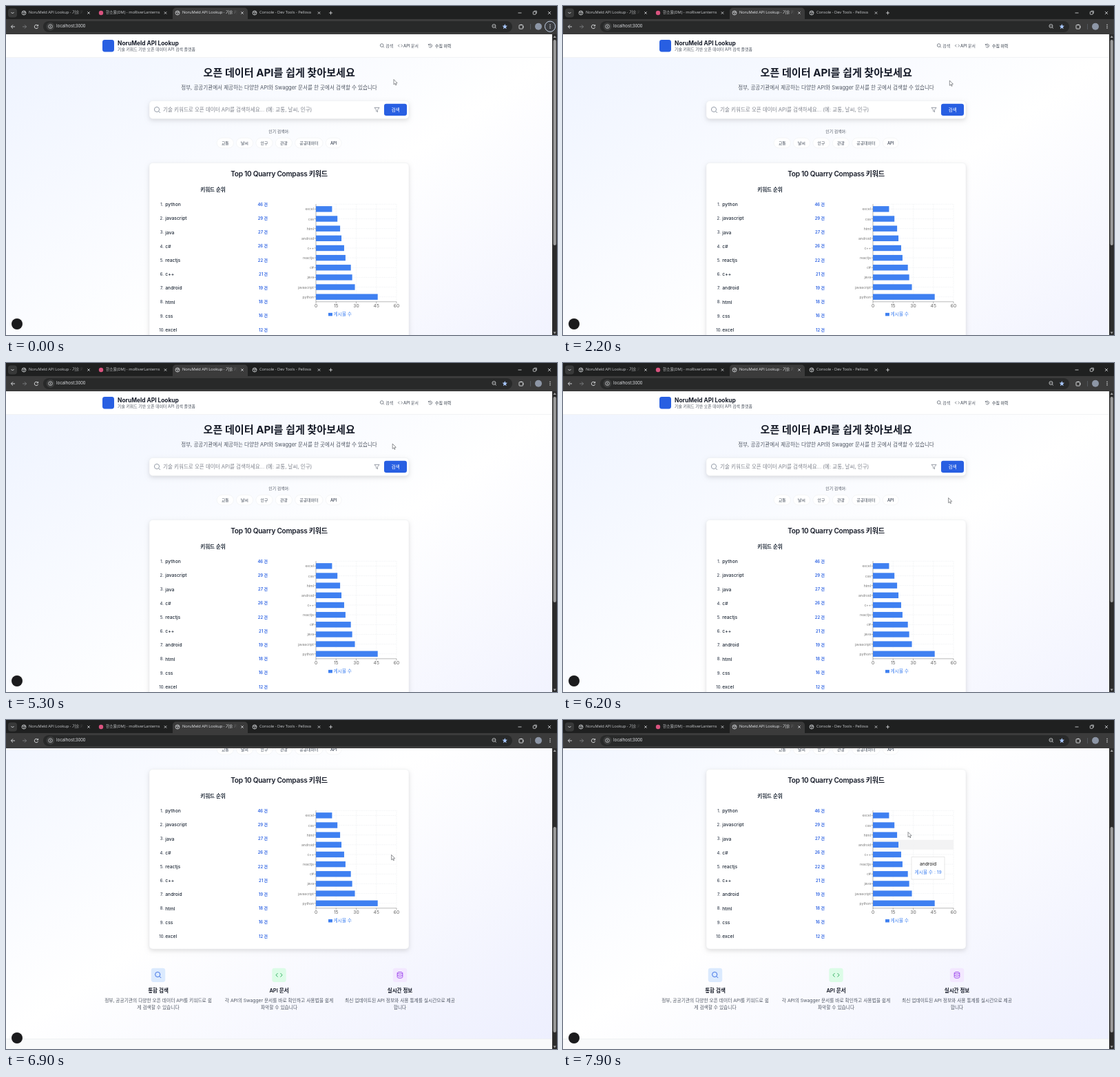
Animation, 800 px wide and 477 px high, one loop 8 s. Source, as an HTML page with a canvas:

```html
<!DOCTYPE html>
<html lang="ko">
<head>
<meta charset="utf-8">
<title>API Lookup</title>
<style>
html, body { margin: 0; width: 100%; height: 100%; overflow: hidden; background: #fff; }
canvas { display: block; width: 800px; height: 477px; }
</style>
</head>
<body>
<canvas id="stage"></canvas>
<script>
const W = 800, H = 477, LOOP = 8000, STEP = 100;
const VIEW_W = 793, VIEW_TOP = 41;
const canvas = document.getElementById('stage');
const dpr = window.devicePixelRatio || 1;
canvas.width = W * dpr;
canvas.height = H * dpr;
const c = canvas.getContext('2d');

const SANS = 'Inter, "Noto Sans CJK KR", "Noto Sans CJK", sans-serif';
const UI = '"Open Sans", "Noto Sans CJK KR", "Noto Sans CJK", sans-serif';
const XS = 5.04, SM = 5.88, BASE = 6.72, LG = 7.56, XL = 8.4;
const BLUE = '#285fe2', BAR = '#3f80f1', INK = '#161b28', GRAY = '#4f5662', BORDER = '#e8eaee';

const KEYWORDS = [
  ['python', 46], ['javascript', 29], ['java', 27], ['c#', 26], ['reactjs', 22],
  ['c++', 21], ['android', 19], ['html', 18], ['css', 16], ['excel', 12]
];
const CHIPS = [['교통', 318.3], ['날씨', 346.5], ['인구', 375], ['관광', 403.4], ['공공데이터', 439.8], ['API', 475.7]];
const FEATURES = [
  { x: 221, bg: '#dbeafe', ink: BLUE, icon: searchIcon, title: '통합 검색',
    lines: ['정부, 공공기관의 다양한 오픈 데이터 API를 키워드로 쉽', '게 검색할 수 있습니다'] },
  { x: 396.5, bg: '#dcfce7', ink: '#16a34a', icon: codeIcon, title: 'API 문서',
    lines: ['각 API의 Swagger 문서를 바로 확인하고 사용법을 쉽게', '파악할 수 있습니다'] },
  { x: 572, bg: '#f3e8ff', ink: '#9333ea', icon: dataIcon, title: '실시간 정보',
    lines: ['최신 업데이트된 API 정보와 사용 통계를 실시간으로 제공', '합니다'] }
];

// Keys: [time, value, value, ...], eased between neighbours
const POINTER = [[0, 563, 106.5], [1900, 563, 106.5], [2200, 561.3, 108], [2600, 561.3, 108],
  [3100, 561.3, 110.8], [5200, 561.3, 110.8], [5800, 559.6, 195.5], [7400, 559.6, 195.5], [7900, 501, 162.5]];
const SCROLL = [[0, 0], [6700, 0], [6900, 156]];
const TIP = [[7600, 532, 202], [7900, 506, 198.5]];

function track(keys, t) {
  let i = 0;
  while (i < keys.length - 1 && keys[i + 1][0] <= t) i++;
  const a = keys[i], b = keys[i + 1];
  if (!b || t < a[0]) return a.slice(1);
  const k = (t - a[0]) / (b[0] - a[0]), e = k * k * (3 - 2 * k);
  return a.slice(1).map((v, n) => v + (b[n + 1] - v) * e);
}

function text(s, x, y, size, color, weight = 400, align = 'left', family = SANS) {
  c.font = `${weight} ${size}px ${family}`;
  c.textAlign = align;
  c.textBaseline = 'middle';
  c.fillStyle = color;
  c.fillText(s, x, family === SANS ? y + size * 0.04 : y);
}

function rect(x, y, w, h, color) {
  c.fillStyle = color;
  c.fillRect(x, y, w, h);
}

function box(x, y, w, h, r, fill, border, lw = 0.45) {
  c.beginPath();
  c.roundRect(x, y, w, h, r);
  if (fill) { c.fillStyle = fill; c.fill(); }
  if (border) { c.strokeStyle = border; c.lineWidth = lw; c.stroke(); }
}

function disc(x, y, r, fill, border, lw = 0.8) {
  box(x - r, y - r, 2 * r, 2 * r, r, fill, border, lw);
}

// Each argument after the width is a flat list x, y, x, y, ...
function lines(color, lw, ...paths) {
  c.strokeStyle = color;
  c.lineWidth = lw;
  c.beginPath();
  for (const p of paths)
    for (let i = 0; i < p.length; i += 2) i ? c.lineTo(p[i], p[i + 1]) : c.moveTo(p[i], p[i + 1]);
  c.stroke();
}

function panel(x, y, w, h) {
  c.save();
  c.shadowColor = 'rgba(0,0,0,.13)';
  c.shadowBlur = 6.5 * dpr;
  c.shadowOffsetY = 2.6 * dpr;
  box(x, y, w, h, 5, '#fff');
  c.restore();
  box(x, y, w, h, 5, null, BORDER);
}

function searchIcon(x, y, s, color, lw = 0.8) {
  disc(x - s * 0.08, y - s * 0.08, s * 0.36, null, color, lw);
  lines(color, lw, [x + s * 0.18, y + s * 0.18, x + s * 0.42, y + s * 0.42]);
}

function codeIcon(x, y, s, color, lw = 0.8) {
  const a = s * 0.2, b = s * 0.45, h = s * 0.27;
  lines(color, lw, [x - a, y - h, x - b, y, x - a, y + h], [x + a, y - h, x + b, y, x + a, y + h]);
}

function dataIcon(x, y, s, color, lw = 0.8) {
  const rx = s * 0.38, ry = s * 0.14, top = y - s * 0.3;
  c.strokeStyle = color;
  c.lineWidth = lw;
  c.beginPath();
  c.ellipse(x, top, rx, ry, 0, 0, Math.PI * 2);
  for (const d of [0.3, 0.6]) {
    c.moveTo(x + rx, top + s * d);
    c.ellipse(x, top + s * d, rx, ry, 0, 0, Math.PI);
  }
  c.moveTo(x - rx, top); c.lineTo(x - rx, top + s * 0.6);
  c.moveTo(x + rx, top); c.lineTo(x + rx, top + s * 0.6);
  c.stroke();
}

function historyIcon(x, y, color) {
  c.strokeStyle = color;
  c.lineWidth = 0.7;
  c.beginPath();
  c.arc(x, y, 2.5, -2.6, 2.7);
  c.stroke();
  lines(color, 0.7, [x - 2.6, y - 2.7, x - 2.6, y - 1, x - 0.9, y - 1], [x, y - 1.4, x, y + 0.1, x + 1.2, y + 0.8]);
}

function globe(x, y) {
  disc(x, y, 3, null, '#d5d7da', 0.8);
  lines('#d5d7da', 0.9, [x - 2.4, y - 1.2, x - 0.2, y - 0.6, x + 0.4, y + 0.8, x - 0.4, y + 2.4], [x + 0.4, y - 2.4, x + 1, y - 0.8, x + 2.6, y - 0.2]);
}

function cross(x, y, s, color) {
  lines(color, 0.8, [x - s, y - s, x + s, y + s], [x + s, y - s, x - s, y + s]);
}

function tabTitle(s, x, end, color) {
  const fade = c.createLinearGradient(end - 12, 0, end, 0);
  fade.addColorStop(0, color);
  fade.addColorStop(1, 'rgba(160,160,160,0)');
  text(s, x, 10, 5.7, fade, 400, 'left', UI);
}

function browser(t) {
  const pale = '#dfe1e4';
  rect(0, 0, W, 20, '#1f2020');
  rect(0, 19, W, 22, '#3b3b3b');
  box(3, 3.5, 13, 13, 4, '#383939');
  lines(pale, 0.9, [7.5, 9, 9.5, 11, 11.5, 9]);

  box(242, 2.5, 109, 20, [5, 5, 0, 0], '#3b3b3b');
  globe(26, 10);
  tabTitle('NoruMeld API Lookup - 기술 키워드', 33, 113, '#c9cbce');
  disc(138, 10, 3.2, '#d9537f');
  tabTitle('한소율(DM) - moRiverLanterns', 145, 236, '#c9cbce');
  globe(249, 10);
  tabTitle('NoruMeld API Lookup - 기술 키워드', 256, 337, '#e8eaed');
  globe(361, 10);
  tabTitle('Console - Dev Tools - Pellova', 368, 458, '#c9cbce');
  for (const x of [120, 231.5, 343, 454.5]) cross(x, 10, 1.7, pale);
  lines(pale, 0.8, [469, 10, 474, 10], [471.5, 7.5, 471.5, 12.5]);
  lines(pale, 0.8, [743.5, 10, 748.5, 10]);
  box(765.3, 8.2, 4, 4, 0.6, null, pale, 0.8);
  lines(pale, 0.7, [766.7, 7.2, 770.4, 7.2, 770.4, 10.8]);
  cross(789, 10, 2.1, pale);

  lines(pale, 0.9, [13, 30, 7.5, 30], [10, 27.4, 7.4, 30, 10, 32.6]);
  lines('#7d7f82', 0.9, [24, 30, 29.5, 30], [27, 27.4, 29.6, 30, 27, 32.6]);
  c.strokeStyle = pale;
  c.lineWidth = 0.9;
  c.beginPath();
  c.arc(44, 30, 2.7, 0.3, 5.6);
  c.stroke();
  lines(pale, 0.9, [46.6, 27, 46.6, 29, 44.6, 29]);

  box(54, 22, 681, 16, 8, '#282929');
  disc(64.5, 29.7, 6, '#3b3c3c');
  disc(64.5, 29.7, 2.8, null, pale, 0.7);
  lines(pale, 0.8, [64.5, 29.3, 64.5, 31.2], [64.5, 27.9, 64.5, 28.6]);
  text('localhost:3000', 73, 29.5, 6.3, '#e8eaed', 400, 'left', UI);
  searchIcon(709, 29.6, 7, pale);
  lines(pale, 0.6, [707.3, 29, 709.6, 29]);

  c.fillStyle = '#a8c7fa';
  c.beginPath();
  for (let i = 0; i < 10; i++) {
    const r = i % 2 ? 1.7 : 3.9, a = i * Math.PI / 5 - Math.PI / 2;
    c.lineTo(724.3 + r * Math.cos(a), 30 + r * Math.sin(a));
  }
  c.fill();
  box(745, 27.5, 5.6, 5.6, 0.8, null, pale, 0.9);
  disc(748, 27.3, 0.9, pale);
  disc(750.8, 30.3, 0.9, pale);
  lines('#5b6066', 0.8, [761.5, 26, 761.5, 34]);
  disc(773, 29.7, 5, '#8d96a6');
  if (t < 2000) disc(790, 29.7, 7.6, '#3b3d41', '#d3e1f8', 0.9);
  for (const d of [-2.4, 0, 2.4]) disc(790, 29.7 + d, 0.75, pale);
}

function scrollbar(scroll) {
  rect(VIEW_W, VIEW_TOP, W - VIEW_W, H - VIEW_TOP, '#2c2c2c');
  box(794.6, 49 + scroll * 0.68, 4.2, 298, 2.1, '#9c9c9c');
  c.fillStyle = '#a4a4a4';
  for (const [y, d] of [[46, -3], [472.5, 3]]) {
    c.beginPath();
    c.moveTo(794.6, y); c.lineTo(798.8, y); c.lineTo(796.7, y + d);
    c.fill();
  }
}

// Diagonal wash, corner to corner as in CSS "to bottom right"
function background() {
  const y = 75, h = 543, k = VIEW_W * h / (VIEW_W ** 2 + h ** 2);
  const cx = VIEW_W / 2, cy = y + h / 2, dx = h * k, dy = VIEW_W * k;
  const g = c.createLinearGradient(cx - dx, cy - dy, cx + dx, cy + dy);
  g.addColorStop(0, '#eff4ff');
  g.addColorStop(0.5, '#ffffff');
  g.addColorStop(1, '#edeffe');
  rect(0, y, VIEW_W, h, g);
  rect(0, 618, VIEW_W, 40, '#f9fafb');
  rect(0, 618, VIEW_W, 0.5, '#e5e7eb');
}

function header() {
  rect(0, VIEW_TOP, VIEW_W, 34, '#fff');
  rect(0, 74.5, VIEW_W, 0.5, '#e5e7eb');
  box(140, 49, 17, 17.5, 3.4, BLUE);
  text('NoruMeld API Lookup', 162, 53.8, XL, INK, 700);
  text('기술 키워드 기반 오픈 데이터 API 검색 플랫폼', 162, 63.3, SM, GRAY);
  searchIcon(546.2, 57.6, 6.5, GRAY, 0.7);
  text('검색', 551.3, 57.5, SM, GRAY, 500);
  codeIcon(572.5, 57.6, 6.8, GRAY, 0.7);
  text('API 문서', 577, 57.5, SM, GRAY, 500);
  historyIcon(616, 57.6, GRAY);
  text('수집 이력', 623, 57.5, SM, '#1f2937', 500);
}

function hero() {
  text('오픈 데이터 API를 쉽게 찾아보세요', 396.7, 96.8, 15.12, INK, 700, 'center');
  text('정부, 공공기관에서 제공하는 다양한 API와 Swagger 문서를 한 곳에서 검색할 수 있습니다', 396.5, 118, LG, GRAY, 400, 'center');
  panel(208, 137.5, 377, 26);
  searchIcon(219.8, 150.8, 10, '#8b93a1', 0.9);
  text('기술 키워드로 오픈 데이터 API를 검색하세요... (예: 교통, 날씨, 인구)', 228, 150.3, LG, '#80858f');
  lines('#6b7280', 0.7, [535, 147.3, 542, 147.3, 539.5, 150.6, 539.5, 153.6, 537.6, 152.6, 537.6, 150.6, 535, 147.3]);
  box(549, 141.8, 33, 17.2, 3.2, BLUE);
  text('검색', 565.6, 150.3, BASE, '#fff', 500, 'center');
  text('인기 검색어:', 396.5, 181.5, SM, GRAY, 400, 'center');
  for (const [name, x] of CHIPS) {
    c.font = `500 ${SM}px ${SANS}`;
    const w = c.measureText(name).width + 13.4;
    box(x - w / 2, 191.3, w, 14.6, 7.3, '#fff', BORDER);
    text(name, x, 198.6, SM, '#374151', 500, 'center');
  }
}

function card(tip) {
  panel(208, 227.5, 377, 260.5);
  c.letterSpacing = '-0.25px';
  text('Top 10 Quarry Compass 키워드', 396.5, 244, 10.08, INK, 600, 'center');
  c.letterSpacing = '0px';
  text('키워드 순위', 300.5, 266.5, LG, '#1f2937', 600, 'center');
  KEYWORDS.forEach(([name, n], i) => {
    const y = 288 + i * 20.2;
    text(`${i + 1}.`, 226.3, y, SM, '#374151', 500, 'center');
    text(name, 231.3, y, BASE, '#1f2937', 500);
    text(`${n} 건`, 380, y - 0.2, SM, BLUE, 600, 'right');
  });
  chart(tip);
}

function chart(tip) {
  const x0 = 450, x1 = 567, y0 = 287.3, y1 = 428.8;
  const unit = (x1 - x0) / 60, band = (y1 - y0) / 10;
  const rowY = i => y1 - (i + 0.5) * band;

  c.setLineDash([1.3, 1.3]);
  for (let v = 0; v <= 60; v += 15) lines('#dcdfe4', 0.42, [x0 + v * unit, y0, x0 + v * unit, y1]);
  for (let i = 0; i < 10; i++) lines('#dcdfe4', 0.42, [x0, rowY(i), x1, rowY(i)]);
  lines('#dcdfe4', 0.42, [x0, y0, x1, y0]);
  c.setLineDash([]);

  if (tip) rect(x0, rowY(tip.row) - band / 2, x1 - x0, band, 'rgba(243,243,244,.95)');
  lines('#666', 0.45, [x0, y0, x0, y1, x1, y1]);
  KEYWORDS.forEach(([name, n], i) => {
    const y = rowY(i);
    lines('#666', 0.45, [x0 - 2.5, y, x0, y]);
    text(name, x0 - 3, y + 0.3, XS, '#777', 400, 'right');
    rect(x0, y - 4.2, n * unit, 8.4, BAR);
  });
  for (let v = 0; v <= 60; v += 15) {
    const x = x0 + v * unit;
    lines('#666', 0.45, [x, y1, x, y1 + 2.5]);
    text(v, x, 434.8, BASE, '#666', 400, 'center');
  }
  rect(468, 444.9, 5.9, 4.5, BAR);
  text('게시물 수', 475.4, 446.8, BASE, BAR);
}

function features() {
  for (const f of FEATURES) {
    box(f.x - 10.2, 515.7, 20.4, 20.2, 3.4, f.bg);
    f.icon(f.x, 525.8, 10, f.ink, 0.85);
    text(f.title, f.x, 548.2, LG, INK, 600, 'center');
    f.lines.forEach((s, i) => text(s, f.x, 562.9 + i * 10.1, BASE, GRAY, 400, 'center'));
  }
}

function tooltip(tip) {
  const [name, n] = KEYWORDS[tip.row];
  box(tip.x, tip.y, 48, 32.5, 0, '#fff', '#ccc');
  text(name, tip.x + 24, tip.y + 10, BASE, '#111', 400, 'center');
  text(`게시물 수 : ${n}`, tip.x + 24, tip.y + 22, BASE, BAR, 400, 'center');
}

function pointer(x, y) {
  const p = [0, 0, 0, 7.3, 1.7, 5.8, 2.8, 8.3, 3.9, 7.8, 2.8, 5.4, 5.1, 5.2];
  c.beginPath();
  for (let i = 0; i < p.length; i += 2) c.lineTo(x + p[i], y + p[i + 1]);
  c.closePath();
  c.fillStyle = '#fff';
  c.fill();
  c.strokeStyle = '#55585e';
  c.lineWidth = 0.65;
  c.stroke();
}

function draw(t) {
  const [scroll] = track(SCROLL, t);
  let tip = null;
  if (t >= 7600) {
    const [x, y] = track(TIP, t);
    tip = { x, y, row: t < 7800 ? 5 : 6 };
  }
  c.setTransform(dpr, 0, 0, dpr, 0, 0);
  rect(0, 0, W, H, '#fff');

  c.save();
  c.beginPath();
  c.rect(0, VIEW_TOP, VIEW_W, H - VIEW_TOP);
  c.clip();
  c.translate(0, -scroll);
  background();
  header();
  hero();
  card(tip);
  features();
  c.restore();

  if (tip) tooltip(tip);
  disc(16, 461, 8, '#1b1b1d');
  browser(t);
  scrollbar(scroll);
  pointer(...track(POINTER, t));
}

function frame(now) {
  draw(Math.floor((now % LOOP) / STEP) * STEP);
  requestAnimationFrame(frame);
}
requestAnimationFrame(frame);
</script>
</body>
</html>
```
